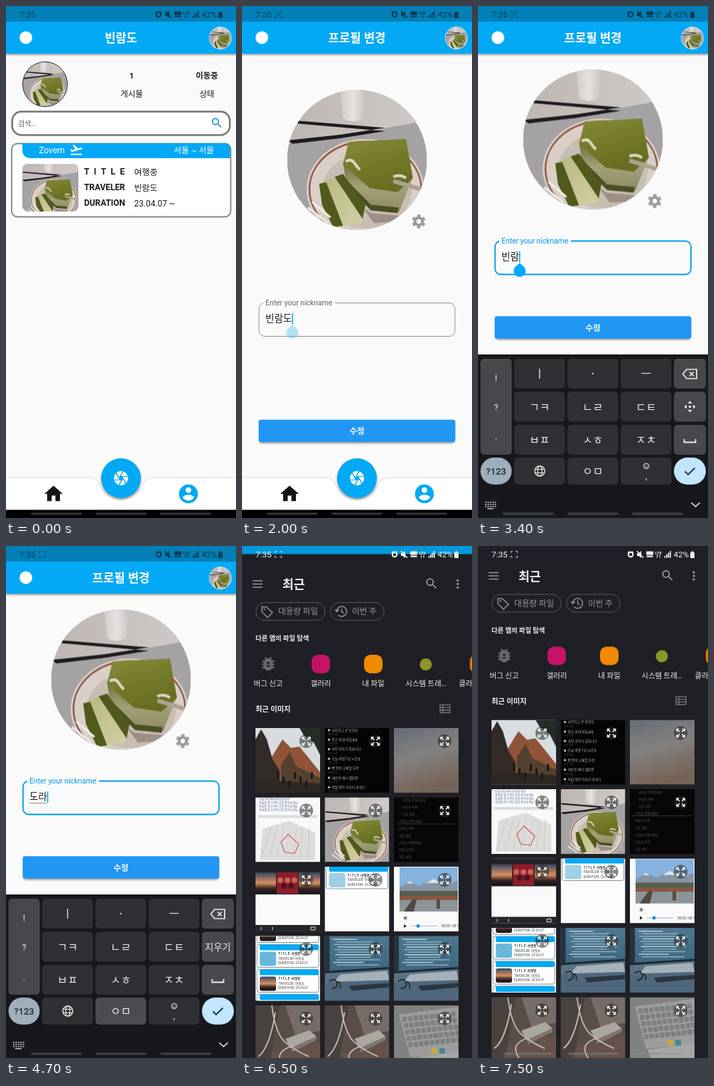
Recreate the animation shown at these times as an HTML page. Size 324x720 px, loop 8000 ms.

```html
<!DOCTYPE html>
<html lang="ko">
<head>
<meta charset="utf-8">
<title>Profile edit</title>
<style>
html, body { margin: 0; width: 100%; height: 100%; overflow: hidden; background: #fafafa; }
svg { display: block; }
text { font-family: Roboto, "Noto Sans CJK KR", "Noto Sans CJK", sans-serif; white-space: pre; }
.m { text-anchor: middle; }
.b { font-weight: 700; }
.list, .prof, .lift, .grip, .sheet, .status, .scrim { animation: 8s linear infinite both; }
.list { animation-name: leave; }
.prof { animation-name: enter; }
.lift { animation-name: lift; animation-timing-function: ease-out; }
.grip { animation-name: grip; }
.sheet { animation-name: sheet; }
.status { animation-name: tint; }
.scrim { animation-name: clear; }
#box { stroke: #929292; stroke-width: 1; }
#label { fill: #666; }
.focus #box { stroke: #039fe6; stroke-width: 1.8; }
.focus #label { fill: #039be5; }
.key { fill: #2f3034; }
.side { fill: #47484c; }
.key.down { fill: #4b4c50; }
.side.down { fill: #66676b; }
@keyframes leave { 0%, 12.4% { opacity: 1 } 15%, 100% { opacity: 0 } }
@keyframes enter { 0%, 12.4% { opacity: 0 } 16%, 100% { opacity: 1 } }
@keyframes lift { 0%, 25.6% { transform: none } 31.25%, 100% { transform: translateY(var(--up)) } }
@keyframes grip {
  0%, 24.9% { opacity: 0 } 25%, 25.6% { opacity: .28 }
  27.5%, 47.4% { opacity: 1 } 47.5%, 100% { opacity: 0 }
}
@keyframes sheet {
  0%, 77.4% { opacity: 0; transform: translateY(90px); animation-timing-function: ease-out }
  80% { opacity: 1; transform: translateY(28px) }
  81.25% { opacity: 1; transform: translateY(11.5px) }
  82.5% { transform: translateY(5px) }
  85%, 100% { opacity: 1; transform: none }
}
@keyframes tint { 0%, 78% { color: #0a3c55 } 80%, 100% { color: #f2f2f2 } }
@keyframes clear { 0%, 77.4% { opacity: .25 } 80%, 100% { opacity: .1 } }
</style>
</head>
<body>
<svg width="100%" height="100%" viewBox="0 0 324 720"></svg>
<script>
const BLUE = '#03a9f4', NAME = '빈람도';
const R = (x, y, w, h, f, r = 0, more = '') =>
  `<rect x="${x}" y="${y}" width="${w}" height="${h}" fill="${f}" rx="${r}" ${more}/>`;
const T = (x, y, s, str, f = '#1c1c1c', cls = '', more = '') =>
  `<text x="${x}" y="${y}" font-size="${s}" fill="${f}" class="${cls}" ${more}>${str}</text>`;
const P = (d, f, more = '') => `<path d="${d}" fill="${f}" ${more}/>`;
const L = (d, c, w = 1, more = '') => `<path d="${d}" fill="none" stroke="${c}" stroke-width="${w}" ${more}/>`;
const C = (x, y, r, f, more = '') => `<circle cx="${x}" cy="${y}" r="${r}" fill="${f}" ${more}/>`;
const G = (x, y, inner, more = '') => `<g transform="translate(${x} ${y})" ${more}>${inner}</g>`;
const range = (n, fn) => Array.from({ length: n }, (_, i) => fn(i)).join('');

// 24-unit icon outlines
const ICONS = {
  home: 'M10 20v-6h4v6h5v-8h3L12 3 2 12h3v8z',
  person: 'M12 2C6.48 2 2 6.48 2 12s4.48 10 10 10 10-4.48 10-10S17.52 2 12 2zm0 3c1.66 0 3 1.34 3 3s-1.34 3-3 3-3-1.34-3-3 1.34-3 3-3zm0 14.2c-2.5 0-4.71-1.28-6-3.22.03-1.99 4-3.08 6-3.08 1.99 0 5.97 1.09 6 3.08-1.29 1.94-3.5 3.22-6 3.22z',
  search: 'M15.5 14h-.79l-.28-.27C15.41 12.59 16 11.11 16 9.5 16 5.91 13.09 3 9.5 3S3 5.91 3 9.5 5.91 16 9.5 16c1.61 0 3.09-.59 4.23-1.57l.27.28v.79l5 4.99L20.49 19l-4.99-5zm-6 0C7.01 14 5 11.99 5 9.5S7.01 5 9.5 5 14 7.01 14 9.5 11.99 14 9.5 14z',
  plane: 'M2.5 19h19v2h-19zm19.57-9.36c-.21-.8-1.04-1.28-1.84-1.06L14.92 10l-6.9-6.43-1.93.51 4.14 7.17-4.97 1.33-1.97-1.54-1.45.39 1.82 3.16.77 1.33 1.6-.43 5.31-1.42 4.35-1.16L21 11.49c.81-.23 1.28-1.05 1.07-1.85z',
  shutter: 'M9.4 10.5l4.77-8.26C13.47 2.09 12.75 2 12 2c-2.4 0-4.6.85-6.32 2.25l3.66 6.35.06-.1zM21.54 9c-.92-2.92-3.15-5.26-6-6.34L11.88 9h9.66zm.26 1h-7.49l.29.5 4.76 8.25C21 16.97 22 14.61 22 12c0-.69-.07-1.35-.2-2zM8.54 12l-3.9-6.75C3.01 7.03 2 9.39 2 12c0 .69.07 1.35.2 2h7.49l-1.15-2zm-6.08 3c.92 2.92 3.15 5.26 6 6.34L12.12 15H2.46zm11.27 0l-3.9 6.76c.7.15 1.42.24 2.17.24 2.4 0 4.6-.85 6.32-2.25l-3.66-6.35-.93 1.6z',
  bug: 'M20 8h-2.81c-.45-.78-1.07-1.45-1.82-1.96L17 4.41 15.59 3l-2.17 2.17a6 6 0 0 0-2.83 0L8.41 3 7 4.41l1.62 1.63C7.88 6.55 7.26 7.22 6.81 8H4v2h2.09L6 12H4v2h2l.09 2H4v2h2.81a6 6 0 0 0 10.38 0H20v-2h-2.09l.09-2h2v-2h-2l-.09-2H20zm-6 8h-4v-2h4zm0-4h-4v-2h4z'
};
const icon = (name, x, y, s, f) =>
  P(ICONS[name], f, `transform="translate(${x - s / 2} ${y - s / 2}) scale(${s / 24})"`);

const grad = (id, dir, ...stops) => `<linearGradient id="${id}" ${dir}>${stops.map((c, i) =>
  `<stop offset="${i / (stops.length - 1)}" stop-color="${c}"/>`).join('')}</linearGradient>`;
const DOWN = 'x2="0" y2="1"';
const defs = `<defs>
<filter id="soft" x="-20%" y="-50%" width="140%" height="200%"><feGaussianBlur stdDeviation="1.6"/></filter>
${grad('haze', 'x2=".3" y2="1"', '#666e78', '#83807f', '#776458')}
${grad('dusk', DOWN, '#34465f', '#8d6a66', '#d5905c', '#3a2423', '#121318')}
${grad('wall', '', '#bdb6b3', '#d0cbc8')}
${grad('cup', '', '#d2ccc9', '#e6e2df', '#c9c3c0')}
${grad('moss', 'x2=".4" y2="1"', '#858b38', '#757b29', '#676e22')}
${grad('cut', DOWN, '#6d713d', '#a3a178', '#8c8a62')}
${grad('cream', 'x2="1" y2="1"', '#b5b67e', '#d3d0a4')}
${grad('screen', DOWN, '#4d7690', '#3d6680')}
<clipPath id="tile"><rect width="91" height="91"/></clipPath>
<clipPath id="cTop"><circle cx="302" cy="45" r="15.5"/></clipPath>
<clipPath id="cList"><circle cx="55" cy="110" r="31.5"/></clipPath>
<clipPath id="cBig"><circle cx="162" cy="216.5" r="98.5"/></clipPath>
<clipPath id="cCard"><rect x="23" y="222" width="79" height="67" rx="8"/></clipPath>
<symbol id="cake" viewBox="0 0 100 100" preserveAspectRatio="xMidYMid slice">
${R(0, 0, 100, 100, '#a5a2a4')}
${P('M0 0H100V22L38 33 0 38Z', 'url(#wall)')}
${P('M38 0H56L54 20Q47 25 40 20Z', 'url(#cup)')}
${P('M0 36 38 32 70 27 100 21.500V23.500L70 29.500 38 34.500 4 38.500Z'.replaceAll('00 ', ' '), '#1d1b1d')}
<ellipse cx="56" cy="71" rx="42" ry="36" fill="#d9cfc6"/>
<ellipse cx="56" cy="71" rx="40" ry="34" fill="none" stroke="#935b49" stroke-width="1.3"/>
<ellipse cx="57" cy="72" rx="32" ry="27" fill="#c8bdb3"/>
${P('M54 84 60 88 82 90 90 80 78 94 62 95Z', '#9c8f86')}
${P('M40 52 59 69 78 72 90 62 80 87 60 85 42 65Z', 'url(#cut)')}
${P('M42 64 60 82 80 84 79 88 60 86 42 68Z', '#4b4f24')}
${P('M44 37 85 35 90 63 79 73 59 70 40 53Z', 'url(#moss)')}
${P('M23 67 39 60 55 82 53 95 34 98 25 82Z', 'url(#cream)')}
${P('M23 67 28 66 40 97 33 98 25 82ZM34 62 40 60 56 82 54 92Z', '#505a1c')}
${L('M42 51q4-2 6 1t4 5M76 62q5-2 9 1', '#d8d6c2', 2)}
${L('M76 65 96 71', '#aaa38f', 3)}
${L('M15 84 29 95M18 80 31 91M11 88 25 98', '#efedea', 1.5)}
</symbol></defs>`;
const photo = (x, y, w, h, clip) =>
  `<g clip-path="url(#${clip})"><use href="#cake" x="${x}" y="${y}" width="${w}" height="${h}"/></g>`;

const pills = (c) => [35, 126, 217].map(x => R(x, 712.6, 72, 2.8, c, 1.4)).join('');

const status = `<g class="status" fill="currentColor" stroke="none">
${T(19, 15.5, 11.8, '7:35', 'currentColor')}
<g id="rec" opacity=".75">${L('M46.5 10V7.5H49M53 7.5h2.5V10M55.5 13.5V16H53M49 16h-2.5v-2.5', 'currentColor', 1)}
<circle id="dot" cx="51" cy="11.8" r="1.8" fill="none" stroke="currentColor"/></g>
${C(215, 12, 3.2, 'none', 'stroke="currentColor" stroke-width="2"')}
${L('M211 9.5 213.5 7.5M219 9.5 216.5 7.5', 'currentColor', 1.3)}
${P('M224 10h2.5l3.5-3v10l-3.5-3H224Z', 'currentColor')}
${L('M224 7 233 16.5', 'currentColor', 1.3)}
${R(237, 7.5, 10, 5, 'currentColor', 1)}${R(237.5, 13.5, 9, 2.2, 'currentColor')}
${T(254, 11.5, 5.6, 'LTE', 'currentColor', 'm b')}${L('M252.5 12.5v4M256 12.5v4', 'currentColor', 1)}
${range(4, i => R(262.5 + i * 2.5, 14 - i * 2.3, 1.7, 2.5 + i * 2.3, 'currentColor'))}
${T(275.5, 15.5, 11.6, '42%', 'currentColor')}
${R(299, 9, 6, 8, 'currentColor', 1)}${R(300.5, 7.5, 3, 2, 'currentColor')}</g>`;

const appBar = R(0, 63, 324, 5.5, '#000', 0, 'opacity=".45" filter="url(#soft)"')
  + R(0, 0, 324, 67, BLUE) + R(0, 0, 324, 22, '#000', 0, 'class="scrim"')
  + C(28, 44.5, 9, '#fff') + photo(286, 29, 32, 32, 'cTop')
  + C(302, 45, 15.7, 'none', 'stroke="#d6e6ee" stroke-width=".8"');

const row = (y, key, value, more = '') =>
  T(110, y, 11.9, key, '#1c1c1c', 'b', more) + T(180.5, y + .5, 11.9, value);
const listPage = `<g class="list">
${T(162, 51, 16.5, NAME, '#fff', 'm b')}
${photo(23, 78, 64, 64, 'cList')}${C(55, 110, 31.5, 'none', 'stroke="#333" stroke-width="1"')}
${T(177, 102, 11.4, '1', '#1c1c1c', 'm b')}${T(283, 102, 11.4, '이동중', '#1c1c1c', 'm b')}
${T(177, 128, 11.5, '게시물', '#1c1c1c', 'm')}${T(283, 128, 11.5, '상태', '#1c1c1c', 'm')}
${R(8.7, 148.5, 306.6, 33, '#fff', 13, 'stroke="#767676" stroke-width="2.5"')}
${T(17, 168.5, 10, '검색...', '#666')}${icon('search', 297, 164.5, 18.5, '#1e88e5')}
${R(8, 193.5, 308.5, 103, '#fff', 8, 'stroke="#858585" stroke-width="1.8"')}
${P('M23 193H309Q316 193 316 201V214H35Q23 214 23 202Z', BLUE)}
${T(46.5, 207, 11.9, 'Zovem', '#fff')}${icon('plane', 99, 202, 20, '#fff')}
${T(293, 207, 11.7, '서울 ~ 서울', '#fff', '', 'text-anchor="end"')}
${photo(23, 216, 79, 79, 'cCard')}
${row(237, 'T I T L E', '여행중', 'word-spacing="3.8"')}${row(259, 'TRAVELER', NAME)}${row(281, 'DURATION', '23.04.07 ~')}</g>`;

const lifted = (up, inner) => `<g class="lift" style="--up:${up}px">${inner}</g>`;
const gear = G(249, 303, C(0, 0, 5.2, 'none', 'stroke="#9b9b9b" stroke-width="4"')
  + C(0, 0, 8.2, 'none', 'stroke="#9b9b9b" stroke-width="3" stroke-dasharray="4.6 3.987" stroke-dashoffset="2.3" transform="rotate(30)"'));
const profilePage = `<g class="prof">${T(162, 50.5, 16.7, '프로필 변경', '#fff', 'm b')}
${lifted(-28.7, photo(63.5, 118, 197, 197, 'cBig') + gear)}
${lifted(-87, `<g id="field">
  <rect id="box" x="24" y="417.500" width="276" height="47" rx="8" fill="none"/>
  ${R(30, 414, 101, 6, '#fafafa')}<text id="label" x="33" y="421" font-size="10.4">Enter your nickname</text>
  ${T(33, 444, 13.5, NAME, '#1c1c1c', '', 'id="value"')}
  <path id="under" d="" stroke="#777" stroke-width=".8"/>
  <g id="cursor">${R(-.7, 432, 1.5, 16, BLUE, 0, 'id="caret"')}
  ${P('M0 448.5 6 453.5A8.5 8.5 0 1 1-6 453.5Z', BLUE, 'class="grip"')}</g></g>`)}
${lifted(-145.5, R(25, 584, 274, 31, '#000', 3, 'opacity=".4" filter="url(#soft)"')
  + R(23.5, 581.7, 277, 31.6, '#2196f3', 3) + T(162, 602, 11.4, '수정', '#fff', 'm b'))}</g>`;

const barShape = 'M0 664H116Q128 664 131 673A33 33 0 0 0 193 673Q196 664 208 664H324V709H0Z';
const bottomNav = P(barShape, '#000', 'opacity=".22" filter="url(#soft)"') + P(barShape, '#fff')
  + C(162, 666, 28, '#000', 'opacity=".4" filter="url(#soft)"') + C(162, 664, 28, BLUE)
  + icon('shutter', 162, 664, 24, '#fff') + icon('home', 67, 686, 31, '#161616')
  + icon('person', 257, 686, 32, BLUE) + R(0, 708.5, 324, 12, '#000') + pills('#343434');

const KEYS = ['ㅣ', '·', 'ㅡ', 'ㄱㅋ', 'ㄴㄹ', 'ㄷㅌ', 'ㅂㅍ', 'ㅅㅎ', 'ㅈㅊ', '', 'ㅇㅁ', ''];
const rowY = [496, 542.5, 589, 635];
const keyRect = (id, x, y, w, h, cls) =>
  `<rect data-key="${id}" class="${cls}" x="${x}" y="${y}" width="${w}" height="${h}" rx="5"/>`;
const W = '#ececee';
const keyboard = lifted(-230, G(0, 230, R(0, 490, 324, 230, '#17181c')
  + keyRect('marks', 3.5, 496, 44, 135, 'side')
  + ['!', '?', '.'].map((c, i) => T(25.5, 528 + i * 41, 13, c, W, 'm')).join('')
  + KEYS.map((k, i) => {
    const x = 51 + i % 3 * 75, y = rowY[i / 3 | 0];
    return keyRect(k || 'fn' + i, x, y, 71.5, i > 8 ? 38 : 42, 'key')
      + T(x + 35.7, y + (i > 8 ? 25 : 27), 15.6, k, W, 'm', 'font-weight="500"');
  }).join('')
  + rowY.slice(0, 3).map((y, i) => keyRect('side' + i, 276, y, 45, 42, 'side')).join('')
  + L('M288.5 517.5 294 511H308V524H294ZM298 514.5l6 6M304 514.5l-6 6', W, 1.7)
  + `<g id="move">${C(298.5, 563.5, 1.7, W)}${range(4, i => P('M-3-4.5 0-8 3-4.5Z', W, `transform="translate(298.5 563.5) rotate(${i * 90})"`))}</g>`
  + T(298.5, 568.5, 13.2, '지우기', W, 'm', 'id="erase" font-weight="500"')
  + L('M290.5 609v4.5H306.5V609', W, 1.8)
  + R(3.5, 635, 44, 38, '#9eaebb', 19) + T(25.5, 659, 13, '?123', '#1d2a34', 'm', 'font-weight="500"')
  + G(87, 654, C(0, 0, 7, 'none', `stroke="${W}" stroke-width="1.4"`)
    + `<ellipse rx="3" ry="7" fill="none" stroke="${W}" stroke-width="1.2"/>` + L('M-6.5-2.5H6.5M-6.5 2.5H6.5', W, 1.2))
  + C(237, 647, 3.8, 'none', `stroke="${W}"`) + L('M235 648q2 2 4 0M235.5 645.5v1M238.5 645.5v1', W, .9)
  + T(237, 665, 13, ',', W, 'm')
  + R(276, 635, 45, 38, '#c2e6fd', 19) + L('M291.5 654.5l4.5 4.5 9.5-9.5', '#17364a', 1.9)
  + range(15, i => R(10 + i % 5 * 3.4, 697 + (i / 5 | 0) * 3, 1.9, 1.8, '#b9bac0')) + R(13, 706, 9, 1.5, '#b9bac0')
  + L('M300.5 698.5l6 5.5 6-5.5', W, 1.6) + pills('#414247')));

// picker thumbnails, each on a 91 x 91 tile
const chat = (rows, c, dy) => rows.map((s, i) =>
  C(6, 3 + i * dy, 1.7, c) + T(10, 4.7 + i * dy, 4.7, s, c) + T(5, 10 + i * dy, 3.4, '사진 공유', '#58585c')).join('');
const card = (y, pic) => R(2, y, 87, 32, '#fff', 3, 'stroke="#8a9299"') + R(6, y, 83, 8, BLUE, 2)
  + R(6, y + 10, 23, 20, pic, 3) + ['T I T L E  여행중', 'TRAVELER  여행자', 'DURATION  23.04.07'].map((s, i) =>
    T(32, y + 15 + i * 6.5, 4.6, s, '#444', i ? '' : 'b')).join('');
const desk = R(0, 0, 91, 91, '#5b7185') + P('M0 0H91V44L0 50Z', 'url(#screen)')
  + range(11, i => R(12 + i * 5 % 9, 4 + i * 3.6, 34 + i * 17 % 36, 1.4, i % 3 ? '#8fb0c1' : '#bccfd8'))
  + L('M0 51 91 45', '#1d2930', 3) + P('M22 54 88 49 91 62 14 64Z', '#a5b1ba') + P('M0 66 91 62V91H0Z', '#4f677d')
  + P('M34 70 91 66V72L38 77Z', '#2a3640')
  + L('M6 64q8-6 11 1t-7 9M17 65q6-2 5 9', '#1c2328', 1.5) + R(0, 0, 7, 50, '#25343f');
const cables = R(0, 0, 91, 91, '#5a4d47') + P('M0 0H34L18 91H0Z', '#4a423e') + P('M42 0H91V36L56 42Z', '#776c67')
  + P('M14 91 24 68 91 52V91Z', '#66524a') + P('M42 47 76 35 86 44 50 60Z', '#aca6a1') + P('M50 60 86 44V49L51 66Z', '#7d7672')
  + L('M23 0Q28 40 42 52T75 72M28 10Q20 60 4 72M50 58Q25 66 39 86', '#c3bcb6', 1.8);
const THUMBS = [
  R(0, 0, 91, 91, '#d6dcdf') + P('M22 42 38 16 50 28 62 26 91 62V91H22Z', '#8f5438')
    + P('M0 91V16L8 2 16 16 24 44 34 60V91Z', '#332b27') + P('M36 91V52L48 34 58 54 91 70V91Z', '#54402f')
    + P('M0 72 91 78V91H0Z', '#2d2823') + range(7, i => R(30 + i * 8, 62 + i % 3 * 6, 3, 10, '#1c1a18', 1))
    + P('M62 0H91V38L82 20 68 10Z', '#262d27'),
  R(0, 0, 91, 91, '#050506') + chat(['사진하고 본 동영상', '장소 안내 파일.jpg', '사진 공지가 있습니다', '오늘 여행 1회 시간표', '빵 먼저 교체할 부분', '새로운 배너 웹툰편', '여덟 명이 이미지 보내기'], '#b4b4b7', 13.4),
  R(0, 0, 91, 91, 'url(#haze)'),
  R(0, 0, 91, 91, '#f8f8f8') + range(4, i => T(5, 5 + i * 5, 4, i ? '자료를 참고하여 길을 찾아보세요' : '다음 지도에서 위치를 확인', '#5d7296'))
    + R(4, 25, 83, 4, '#d9dde2') + P('M10 44 48 33 84 50V88H6Z', '#dcdcdb')
    + range(7, i => L(`M${8 + i * 11} 86 ${22 + i * 9} 42`, '#bfc2c4', .7)) + L('M46 52 61 66 55 79 41 77 36 63Z', '#d6504d', 1.1),
  '<use href="#cake" width="91" height="91"/>',
  R(0, 0, 91, 91, '#070708') + R(3, 37, 85, 1, '#333') + range(9, i => T(i < 3 ? 12 : 7, 6 + i * 10, 4.4, ['사진을 선택하세요', '여행지 목록', '공유 설정'][i % 3], '#525256')),
  R(0, 0, 91, 91, '#fafafa') + R(0, 0, 91, 39, '#202125') + R(0, 8, 29, 30, 'url(#dusk)') + R(30, 8, 30, 30, '#8e1d2a')
    + range(5, i => C(35 + i * 5, 19 + i % 2 * 8, 4, i % 2 ? '#4a1620' : '#c9615c')) + R(61, 8, 30, 30, 'url(#dusk)') + R(0, 82, 91, 9, '#24262a') + L('M8 85v4M24 85v4M78 85h6v4h-6Z', '#ddd'),
  R(0, 0, 91, 91, '#fcfcfc') + card(-1, '#9fcfe6'),
  R(0, 0, 91, 91, '#fafafa') + R(8, 1, 82, 62, '#86b2de') + P('M8 30 22 20 36 27 56 17 74 26 90 20V44H8Z', '#8595a5')
    + P('M18 23 22 20 28 24ZM46 23 56 17 66 23Z', '#dfe4e8') + R(8, 34, 82, 9, '#56604f') + R(8, 41, 82, 6, '#8a5740')
    + R(8, 47, 82, 16, '#8c9498') + P('M14 63 26 46H32L28 63Z', '#51483f') + R(60, 46, 5, 13, '#5e4b3f')
    + C(16, 72, 2.5, '#888') + P('M14 81 18 83.5 14 86Z', '#222') + L('M24 83.5H61', '#abcde5', 1.3) + C(34, 83.5, 2.4, '#168be0') + T(67, 85, 4.5, '00:03 / 00:11', '#333'),
  R(0, 0, 91, 91, '#edf5f8') + card(-23, 'url(#dusk)') + card(12, '#68b8de') + card(47, 'url(#dusk)') + card(82, '#777'),
  desk, desk, cables, cables,
  R(0, 0, 91, 91, '#81817f') + P('M7 13 91 2V66L23 73Z', '#9b9c9b')
    + range(50, i => R(12 + i % 10 * 7.6 + (i / 10 | 0) * 2, 16 + (i / 10 | 0) * 9 - i % 10 * .8, 6.2, 7, '#7d8082', 1))
    + P('M25 74 91 65V91H31Z', '#a6a6a5') + R(53, 60, 8, 8, '#c3aa3c') + R(64, 60, 8, 8, '#49869a')
];
const expand = C(0, 0, 9.7, '#222', 'opacity=".55"')
  + range(4, i => L('M1.5-1.5 5.5-5.5M2.3-5.5H5.5V-2.3', '#f3f3f3', 1.5, `transform="rotate(${i * 90})"`));
const GREY = '#94979c';
const pickerApps = [['버그 신고', 37], ['갤러리', 111], ['내 파일', 185], ['시스템 트레…', 259]];
const picker = `<g class="sheet">${R(0, 0, 324, 720, '#1f2025')}
${L('M15 37.5H29M15 42H29M15 46.5H29', GREY, 1.5)}${T(57, 48.5, 17.2, '최근', '#f4f4f4', 'b')}
${icon('search', 267, 41.5, 20, GREY)}${range(3, i => C(304, 37 + i * 5, 1.7, GREY))}
${R(19.5, 68, 97.5, 25, 'none', 12.5, 'stroke="#57595e"')}${R(124.5, 68, 75.5, 25, 'none', 12.5, 'stroke="#57595e"')}
${L('M28 74h6l9 8-7 7-8-8Z', GREY, 1.4)}${C(31.5, 77.5, 1.2, GREY)}${T(51, 84.5, 11.6, '대용량 파일', GREY)}
${L('M133.5 80.5a7 7 0 1 1 2 5M131 78l2.5 3 3-3M140.5 76.5v4.5l3 2', GREY, 1.4)}${T(155, 84.5, 11.5, '이번 주', GREY)}
${T(19, 122, 9.3, '다른 앱의 파일 탐색', '#eee', 'b')}
${icon('bug', 37, 154, 26, '#66696d')}
${R(98, 141.5, 26, 26, '#c41369', 9)}${R(172, 141.5, 26, 26, '#f08a00', 9)}${C(259, 155, 8.5, '#8c962b')}${R(321, 141.5, 26, 26, '#ee7a08', 9)}
${pickerApps.map(([s, x]) => T(x, 186, 10.4, s, '#ededed', 'm')).join('')}${T(305.5, 186, 10.4, '클라우드', '#ededed')}
${T(19, 221.5, 10.2, '최근 이미지', '#eee', 'b')}
${R(279, 212, 14, 11, 'none', 0, 'stroke="#74777c" stroke-width="1.3"')}${L('M279 215.7h14M279 219.3h14M283 212v11', '#74777c', 1.3)}
${THUMBS.map((s, i) => G(19 + i % 3 * 97.5, 244.5 + (i / 3 | 0) * 97.5,
    `<g clip-path="url(#tile)">${s}</g>` + G(71.5, 18.5, expand))).join('')}
<g opacity=".45">${pills('#8a8a8a')}</g></g>`;

document.querySelector('svg').innerHTML = defs + R(0, 0, 324, 720, '#fafafa') + appBar
  + listPage + profilePage + bottomNav + keyboard + picker + status;

// [start ms, field text, pressed key]
const STEPS = [
  [0, NAME], [3200, NAME, 'side0'], [3300, '빈람'], [3500, '빈', 'side0'], [3600, ''],
  [3800, '', 'ㄷㅌ'], [3900, 'ㄷ', '·'], [4000, 'ㄷ·'], [4100, 'ㄷ·', 'ㅡ'],
  [4200, '도', 'ㄴㄹ'], [4300, '도ㄴ', 'ㄴㄹ'], [4400, '도ㄹ', 'ㅣ'], [4500, '도리'],
  [4600, '도리', '·'], [4700, '도라', 'ㅇㅁ'], [4800, '도랑'], [4900, '도랑', 'ㅇㅁ'],
  [5000, '도람'], [5100, '도람', 'ㅂㅍ'], [5200, '도람ㅂ', 'ㅣ'], [5300, '도람비'],
  [5400, '도람비', 'ㄴㄹ'], [5500, '도람빈']
];
const $ = id => document.getElementById(id);
const show = (id, on) => $(id).setAttribute('visibility', on ? 'visible' : 'hidden');
const keys = document.querySelectorAll('[data-key]');
let start;

function draw(now) {
  start ??= now;
  const t = (now - start) % 8000;
  const [, text, key] = STEPS.findLast(s => s[0] <= t);
  const typing = t >= 3900;
  if ($('value').textContent !== text) $('value').textContent = text;
  const end = 33 + (text ? $('value').getComputedTextLength() : 0);
  $('cursor').setAttribute('transform', `translate(${end + .8} 0)`);
  $('under').setAttribute('d', typing ? `M33 448.5H${end}` : '');
  $('field').classList.toggle('focus', t >= 2100);
  keys.forEach(k => k.classList.toggle('down', k.dataset.key === key));
  show('caret', t >= 2000 && t < 6000 && !(t >= 3000 && t < 3200));
  show('move', !typing);
  show('erase', typing);
  show('rec', t >= 100);
  show('dot', t >= 500 && t < 3800);
  requestAnimationFrame(draw);
}
requestAnimationFrame(draw);
</script>
</body>
</html>
```
